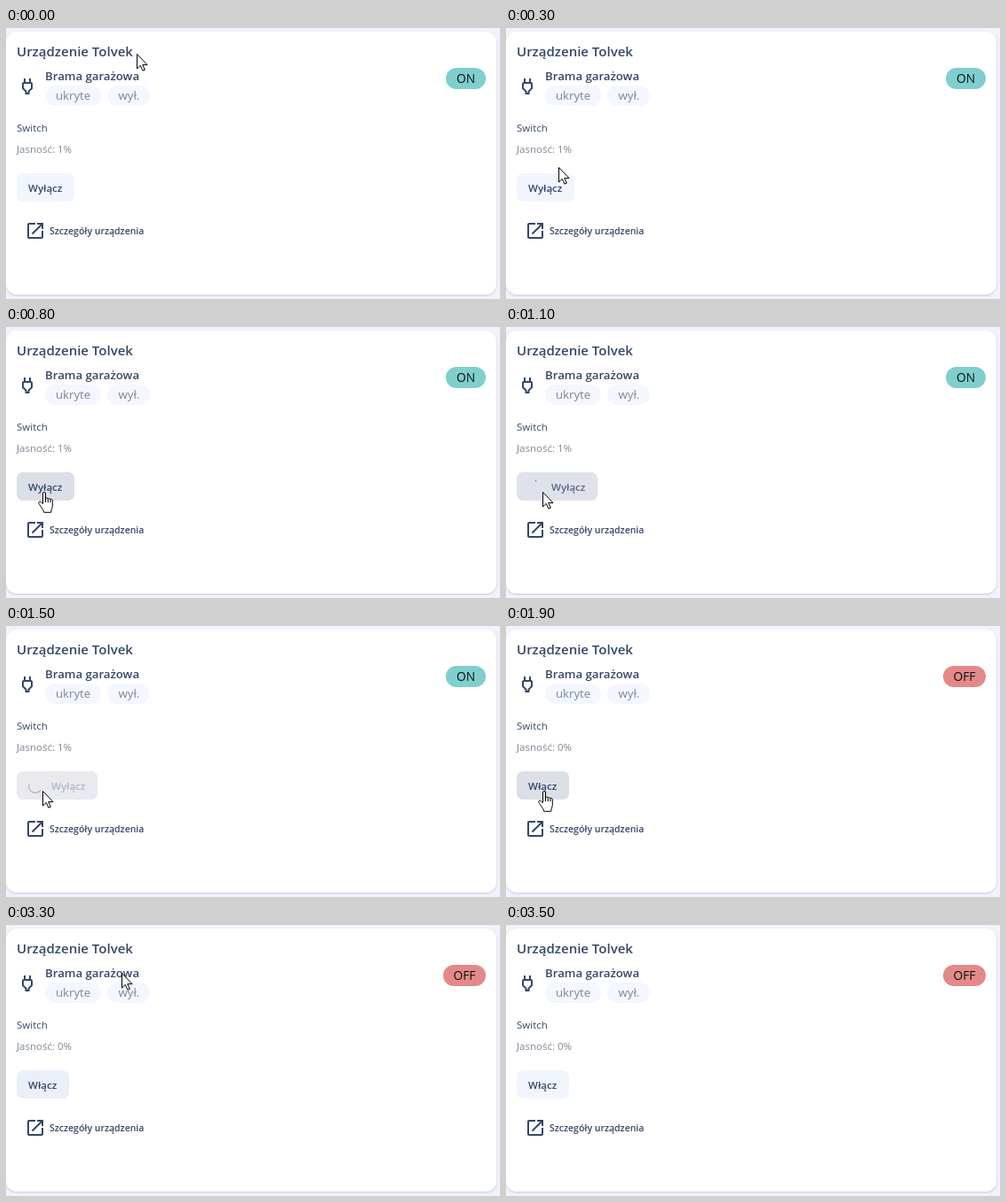
An HTML page for the animation above (5100 ms loop, 556 by 306 pixels).

```html
<!DOCTYPE html>
<html lang="pl">
<head>
<meta charset="utf-8">
<title>Brama garażowa</title>
<style>
  html, body { margin: 0; width: 100%; height: 100%; overflow: hidden; background: #f0f3fd; }
  svg { display: block; width: 556px; height: 306px; }
  text { font: 13.2px "Open Sans", "Noto Sans", sans-serif; fill: #344767; }
  .card { fill: #fff; filter: drop-shadow(0 1px 1.2px #7d89a566); }
  .icon { fill: #344767; }
  .chip rect { fill: #f4f7ff; }
  .chip text { fill: #77859b; }
  text.title { font-size: 15px; font-weight: 600; }
  text.name { font-size: 13.2px; font-weight: 600; }
  text.small { font-size: 11.5px; }
  text.muted { fill: #7b8794; }
  text.label { font-size: 11.5px; font-weight: 600; }
  text.link { font-size: 10.5px; font-weight: 600; }
  #state { font-size: 13.8px; fill: #111; text-anchor: middle; }
  #spinner { fill: none; stroke: #344767; stroke-width: 3.6; }
  #cursor path { fill: #fff; stroke: #000; stroke-linejoin: round; }
</style>
</head>
<body>
<svg viewBox="0 0 556 306">
  <rect class="card" y="4" width="552" height="297" rx="12"/>

  <text class="title" x="12" y="32">Urządzenie Tolvek</text>
  <path class="icon" transform="translate(12 54)" d="M16 9v4.66l-3.5 3.51V19h-1v-1.83L8 13.65V9h8m0-6h-2v4h-4V3H8v4C6.9 7 6 7.9 6 9v5.5L9.5 18v3h5v-3l3.5-3.5V9c0-1.1-.9-2-2-2z"/>
  <text class="name" x="44" y="59">Brama garażowa</text>
  <g class="chip">
    <rect x="44" y="65" width="63" height="23" rx="11.5"/>
    <text x="56" y="81">ukryte</text>
    <rect x="114" y="65" width="48" height="23" rx="11.5"/>
    <text x="126.5" y="81">wył.</text>
  </g>

  <rect id="pill" y="45" height="24" rx="12"/>
  <text id="state" y="62"></text>

  <text class="small" x="12" y="117">Switch</text>
  <text class="small muted" id="level" x="12" y="141"></text>

  <rect id="button" x="12" y="164" height="32" rx="7"/>
  <g id="content">
    <circle id="spinner" r="20.2"/>
    <text class="label" id="label" y="185"></text>
  </g>

  <path class="icon" transform="translate(21 217)" d="M19 19H5V5h7V3H5c-1.1 0-2 .9-2 2v14c0 1.1.9 2 2 2h14c1.1 0 2-.9 2-2v-7h-2zM14 3v2h3.6l-9.8 9.8 1.4 1.4L19 6.4V10h2V3z"/>
  <text class="link" x="49" y="233">Szczegóły urządzenia</text>

  <g id="cursor">
    <path id="arrow" d="M.5.5V17l3.8-3.6 2.6 5.8 2.4-1-2.6-5.6H12z"/>
    <g id="hand" transform="translate(-5)">
      <path d="M5.5 13.5V2a1.5 1.5 0 0 1 3 0V8c0-1.3 2.8-1.2 2.8.4 0-1.2 2.6-1 2.6.6 0-1 2.4-.8 2.4.8V16c0 2.5-1.6 4-1.6 7.3H6.7c0-2.6-2.6-4.6-4.2-7.6-.8-1.5-1.8-2.3-1.8-3.3 0-1.5 2-1.6 3-.4z"/>
      <path d="M8.5 8v4M11.3 8.4v3.8M13.9 9v3.2"/>
    </g>
  </g>
</svg>
<script>
const LOOP = 5100, STEP = 100, SPIN = 1450;
const HOVER = 300, BUSY = 1100, DONE = 1600, LEAVE = 3000, GONE = 3400;
const HOME = [147, 29], TARGET = [43, 181], REST = [41, 186];
const IDLE = [241, 245, 254], DARK = [219, 223, 231], DISABLED = [233, 233, 240];

const $ = id => document.getElementById(id);
const set = (id, attrs) => {
  for (const key in attrs) $(id).setAttribute(key, attrs[key]);
};
const show = (id, on) => set(id, { visibility: on ? "visible" : "hidden" });
const mix = (a, b, k) => a.map((v, i) => Math.round(v + (b[i] - v) * k));

// Eased progress from 0 to 1
function ramp(t, start, length) {
  const x = Math.min(1, Math.max(0, (t - start) / length));
  return x * x * (3 - 2 * x);
}

function mouse(t) {
  const there = mix(HOME, TARGET, ramp(t, 0, 400));
  const resting = mix(there, REST, ramp(t, 500, 100));
  return mix(resting, HOME, ramp(t, LEAVE, GONE - LEAVE));
}

function drawSpinner(ms) {
  const p = ms % SPIN / SPIN;
  const grow = ramp(p, 0, .5), chase = ramp(p, .5, .5);
  set("spinner", {
    transform: `translate(33 181) scale(${16 / 44}) rotate(${p * 360 - 90})`,
    "stroke-dasharray": `${3 + 97 * grow} 200`,
    "stroke-dashoffset": -15 * grow - 110 * chase
  });
}

function draw(t) {
  const off = t >= DONE, busy = t >= BUSY && !off;
  const width = off ? 59 : busy ? 91 : 65;

  set("pill", { x: off ? 492 : 495, width: off ? 48 : 45, fill: off ? "#e48989" : "#7fcfce" });
  set("state", { x: off ? 516 : 517.5 });
  $("state").textContent = off ? "OFF" : "ON";
  $("level").textContent = `Jasność: ${off ? 0 : 1}%`;

  const hover = ramp(t, HOVER, 250) - ramp(t, LEAVE + 100, 300);
  const dim = ramp(t, BUSY - 150, 400) - ramp(t, DONE, 300);
  set("button", { width, fill: `rgb(${mix(mix(IDLE, DARK, hover), DISABLED, dim)})` });
  set("content", { opacity: 1 - .7 * dim });
  set("label", { x: busy ? 51 : 25 });
  $("label").textContent = off ? "Włącz" : "Wyłącz";
  show("spinner", busy);
  if (busy) drawSpinner(t - BUSY);

  const [x, y] = mouse(t);
  const over = x >= 12 && x <= 12 + width && y >= 164 && y <= 196;
  const shown = t < GONE;
  set("cursor", { transform: `translate(${x} ${y})` });
  show("hand", shown && over && !busy);
  show("arrow", shown && (!over || busy));
}

function frame() {
  const t = performance.now() % LOOP;
  draw(Math.floor(t / STEP) * STEP);
  requestAnimationFrame(frame);
}
frame();
</script>
</body>
</html>
```
